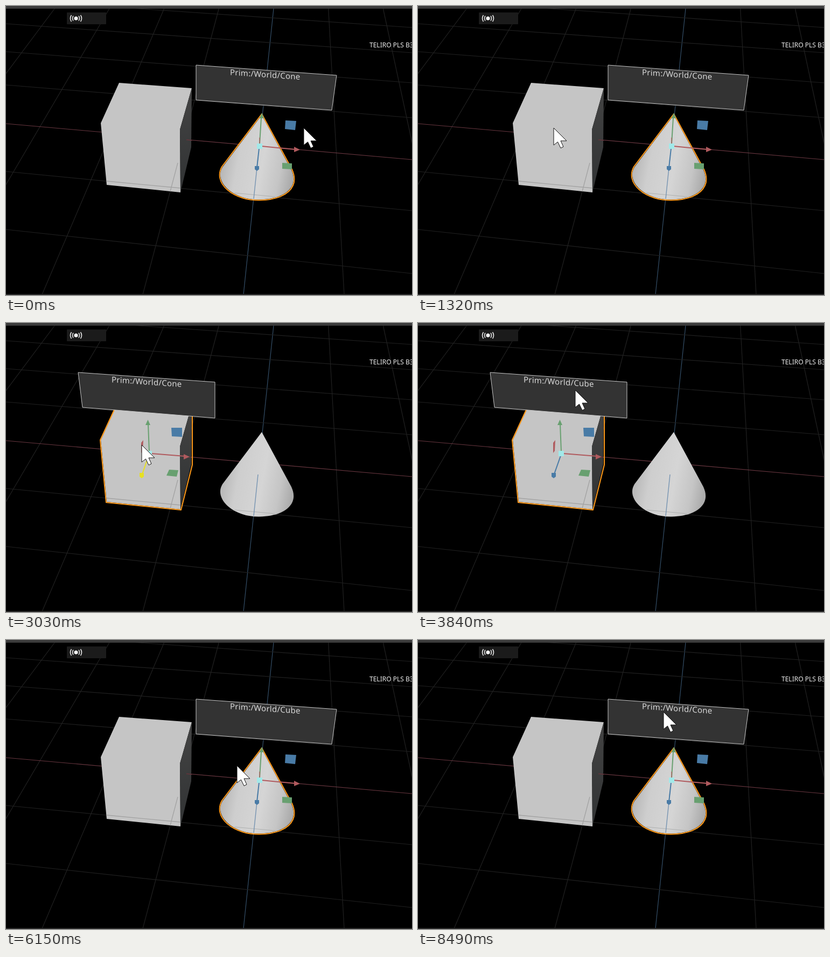
An HTML page that plays this animation: 754 px wide and 538 px high, repeating every 8.52 s.

```html
<!DOCTYPE html>
<html lang="en">
<head>
<meta charset="utf-8">
<title>Object info panel</title>
<style>
html, body { margin: 0; width: 100%; height: 100%; overflow: hidden; background: #000; }
svg { display: block; }
text { font-family: "Noto Sans", "Open Sans", sans-serif; }
.panel path { fill: #333; stroke: #c8c8c8; stroke-width: 1; }
.panel text { font-size: 15px; letter-spacing: .25px; fill: #d8d8d8; }
.outline { fill: none; stroke: #ff9a1a; stroke-width: 2; stroke-linejoin: round; }
.x { fill: #b05a5e; } .y { fill: #68a070; } .z { fill: #497ba6; } .mid { fill: #a2e9e9; }
.axis { fill: none; stroke-width: 2; }
.axis.x { stroke: #b05a5e; } .axis.y { stroke: #68a070; } .axis.z { stroke: #497ba6; }
.hover .grip { fill: #e6e022; }
.hover .axis.grip { stroke: #e6e022; }
</style>
</head>
<body>
<svg width="754" height="538" viewBox="0 0 754 538">
  <defs>
    <linearGradient id="coneFill" gradientUnits="userSpaceOnUse" x1="405" y1="288" x2="532" y2="312">
      <stop offset="0" stop-color="#b9b9b9"/>
      <stop offset=".2" stop-color="#cecece"/>
      <stop offset=".55" stop-color="#d5d5d5"/>
      <stop offset=".82" stop-color="#c5c5c5"/>
      <stop offset="1" stop-color="#acacac"/>
    </linearGradient>
    <linearGradient id="sideFill" x1="0" y1="0" x2="0" y2="1">
      <stop offset="0" stop-color="#444"/>
      <stop offset="1" stop-color="#303233"/>
    </linearGradient>
  </defs>

  <g id="grid" stroke-width="1.2"></g>
  <rect width="754" height="5" fill="#3b3b3b"/>
  <rect y="536" width="754" height="2" fill="#252525"/>

  <rect x="113" y="12" width="73" height="22" rx="1" fill="#1b1b1b"/>
  <circle cx="130" cy="23" r="3.6" fill="#f2f2f2"/>
  <path d="M125 18.5q-3 4.5 0 9M135 18.5q3 4.5 0 9M121.500 17q-4 6 0 12M138.500 17q4 6 0 12"
        fill="none" stroke="#e8e8e8" stroke-width="1.6"/>
  <text x="675" y="77" font-size="12" fill="#eee">TELIRO PLS B3</text>

  <!-- cube -->
  <path d="M210 143L345 153L323 230L324 347L187 333L176 218Z" fill="#c5c5c5"/>
  <path d="M345 153L344 263L324 347L323 230Z" fill="url(#sideFill)"/>
  <path d="M187 326L324 339M319 292L305 345" fill="none" stroke="#a2a2a2" stroke-width="1.3"/>
  <path d="M335 249L345 250" stroke="#67343c" stroke-width="1.3"/>

  <!-- cone -->
  <path id="cone" fill="url(#coneFill)"
        d="M475 203L402 300C394 313 398 328 412 341C428 355 450 361 471 360.500C500 360 524 351 532 333C536 323 534 314 530 305Z"/>
  <path d="M424 348L500 355" stroke="#aeb0b0" stroke-width="1.2"/>
  <path d="M468 282L460 359" stroke="#7593b1" stroke-width="1.4"/>

  <g id="coneSel">
    <path class="outline" d="M475 201L401 299C393 313 396 329 411 342C427 356 450 362 471 361.500C501 361 525 352 533 334C538 323 535 313 531 304Z"/>
    <g class="panel">
      <path d="M353 110L614 129L605 194L353 175Z"/>
      <text transform="translate(416 128.500) skewY(3.800)"></text>
    </g>
    <path class="axis y" d="M471 256L474 208"/>
    <path class="axis x" d="M471 245V256" stroke-opacity=".6"/>
    <path class="axis x" d="M475 261L537 267"/>
    <path class="axis z" d="M470 265L466 301"/>
    <path class="y" d="M475 199L479 209L471 209Z"/>
    <path class="x" d="M546 267.500L535 262L535 272Z"/>
    <path class="z" d="M462 298H470V304L466 307L462 304Z"/>
    <path class="z" d="M519 213L539 214L537 231L518 229Z"/>
    <path class="y" d="M513 292L531 293L531 304L513 303Z"/>
    <rect class="mid" x="466" y="256" width="10" height="10"/>
  </g>

  <g id="cubeSel">
    <path class="outline" d="M210 142L346 152V264L325 348L186 334L175 218Z"/>
    <g class="panel">
      <path d="M134 92L388 110L388 177L142 157Z"/>
      <text transform="translate(196 110.500) skewY(3.800)"></text>
    </g>
    <path class="axis y" d="M266 240L264 188"/>
    <path class="axis x" d="M270 243L332 248"/>
    <path class="axis z grip" d="M265 247L253 281"/>
    <path class="y" d="M263.500 180L268 190L259 190Z"/>
    <path class="x" d="M341 249L330 244V254Z"/>
    <path class="z grip" d="M248 279L256 279L256 286L252 289L248 286Z"/>
    <path class="x" d="M251 223L255 218L254 238L251 242Z"/>
    <path class="z" d="M307 195H327V212L308 211Z"/>
    <path class="y" d="M303 273L320 274L317 286L298 284Z"/>
    <rect class="mid" x="261" y="238" width="10" height="10"/>
  </g>

  <path id="cursor" d="M0 0V32L7.500 26L13 37.500L18 35L13 24H24Z" fill="#fff" stroke="#111" stroke-width="1"/>
</svg>
<script>
const LOOP = 8520;
const $ = id => document.getElementById(id);
const labels = document.querySelectorAll(".panel text");

// floor grid in perspective, with the two world axes coloured
const line = (x1, y1, x2, y2, color) =>
  `<path d="M${x1} ${y1}L${x2} ${y2}" stroke="${color}"/>`;
const leftY = [-12, 33, 85, 147, 219, 308, 416];
const rightY = [40, 87, 143, 208, 286, 381, 498];
let grid = "";
for (let i = -4; i <= 2; i++)
  grid += line(497 + 101.7 * i, 5, 441 + 187 * i, 537, i ? "#202020" : "#344f68");
leftY.forEach((y, i) => grid += line(0, y, 754, rightY[i], i === 4 ? "#683740" : "#202020"));
$("grid").innerHTML = grid;

// cursor moves: start time, end time, destination
const start = [553, 227];
const moves = [
  [120, 870, 252, 227],
  [3150, 3510, 292, 125],
  [4560, 5220, 382, 225],
  [5460, 5790, 429, 234],
  [7290, 7740, 456, 134],
];
const ease = p => p * p * (3 - 2 * p);

function cursorAt(t) {
  let [x, y] = start;
  for (const [from, to, toX, toY] of moves) {
    const p = ease(Math.min(1, Math.max(0, (t - from) / (to - from))));
    x += (toX - x) * p;
    y += (toY - y) * p;
  }
  return [x, y];
}

function draw(t) {
  const cubeOn = t >= 2190 && t < 5910;
  const name = t >= 3300 && t < 7530 ? "Cube" : "Cone";
  $("cubeSel").style.display = cubeOn ? "" : "none";
  $("coneSel").style.display = cubeOn ? "none" : "";
  $("cubeSel").classList.toggle("hover", t < 3210);
  labels.forEach(label => label.textContent = "Prim:/World/" + name);
  $("cursor").setAttribute("transform", `translate(${cursorAt(t)})`);
}

const begin = performance.now();
function tick() {
  draw((performance.now() - begin) % LOOP);
  requestAnimationFrame(tick);
}
tick();
</script>
</body>
</html>
```
